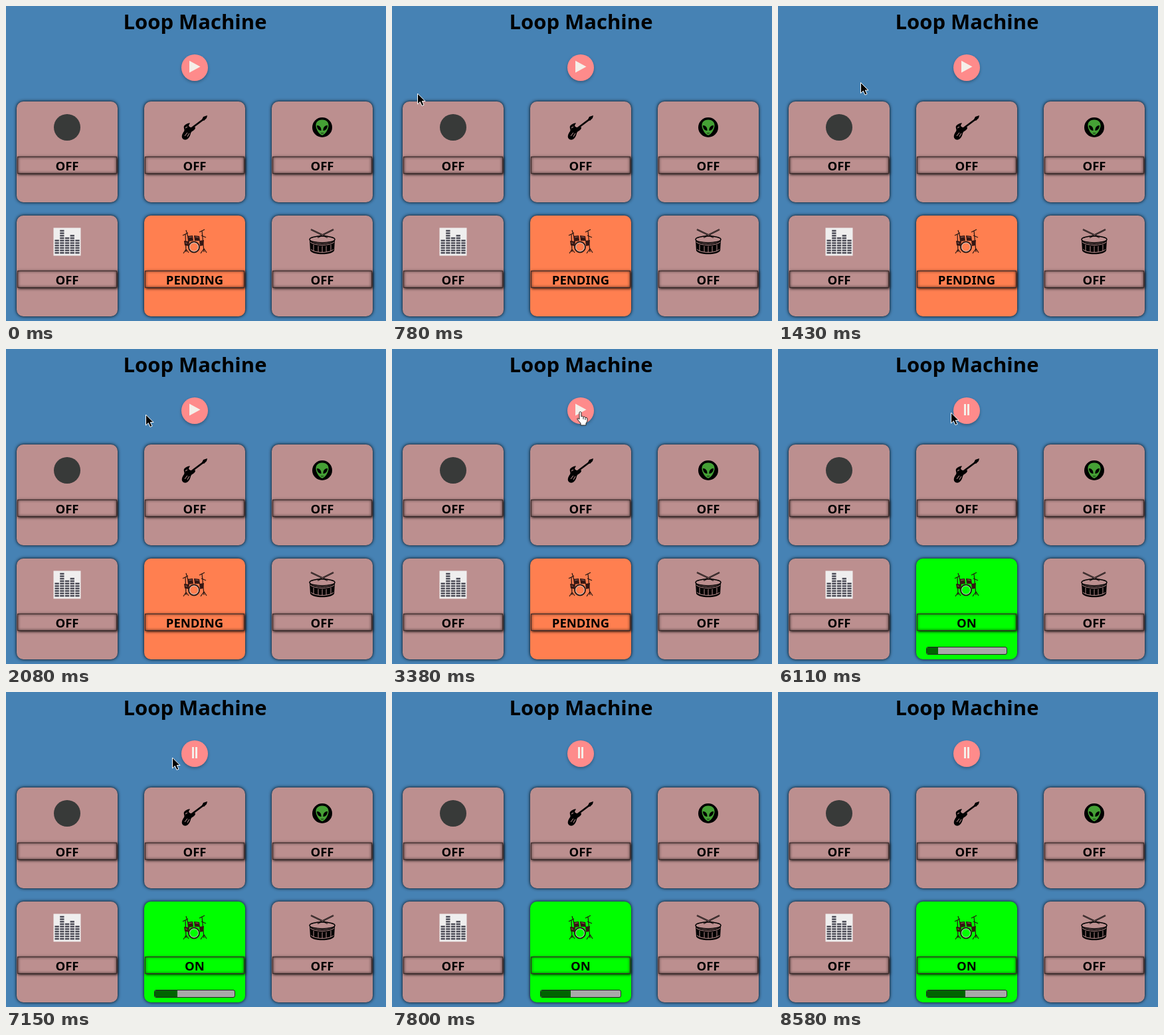
Write an HTML page that moves like this. It is 572x475 px and loops after 8710 ms.

```html
<!DOCTYPE html>
<html lang="en">
<head>
<meta charset="utf-8">
<title>Loop Machine</title>
<style>
  html, body { margin: 0; width: 100%; height: 100%; overflow: hidden; }
  body { position: relative; background: #4682b4; font: bold 18.5px "Noto Sans", "Open Sans", sans-serif; color: #000; }
  h1 { position: absolute; left: 0; top: 1px; width: 569px; margin: 0; font-size: 31px; line-height: 44px; text-align: center; }
  svg { position: absolute; overflow: visible; }
  #button { position: absolute; left: 264px; top: 73px; width: 40px; height: 40px; border-radius: 50%;
    background: #fe8b8b; box-shadow: 0 2px 4px rgba(0,0,0,.3); }
  .tile { position: absolute; width: 152px; height: 152px; border-radius: 10px; background: #bc8f8f; box-shadow: 0 0 5px #000; }
  .tile svg { left: 56px; top: 19px; }
  .label { position: absolute; left: 1px; top: 83px; width: 148px; height: 24px; line-height: 26px; text-align: center;
    border: 1px solid #3a2a2a; box-shadow: 1px 1px 4px #000, inset 0 0 4px rgba(0,0,0,.65); }
  .pending { background: #ff7f50; }
  .on { background: #0f0; }
  .bar { position: absolute; left: 15px; top: 133px; width: 120px; height: 10px; border: 1px solid #222;
    border-radius: 3px; background: #a9a9a9; overflow: hidden; visibility: hidden; }
  .on .bar { visibility: visible; }
  .bar i { display: block; height: 100%; background: #006400; }
</style>
</head>
<body>
<h1>Loop Machine</h1>
<div id="button">
  <svg width="40" height="40" fill="#f5efe9">
    <path id="play" d="M12 9.500L28.500 18.500 12 27.500z"/>
    <path id="pause" d="M16 10h3v17h-3zM21 10h3v17h-3z"/>
  </svg>
</div>
<script>
const $ = id => document.getElementById(id);

const equalizer = [6, 10, 7, 8, 6].map((count, col) =>
  Array.from({ length: count }, (_, row) =>
    `<rect x="${1.5 + col * 7.7}" y="${36 - row * 3.7}" width="6.3" height="2.5"/>`).join('')).join('');

const icons = [
  '<circle cx="20" cy="20" r="20" fill="#383a39"/>',

  `<path d="M3 38C-1 35 1 30 4 26C6 23 1 19 6 16C9 14 12 13 13 14C10 17 11 19 14 20C17 21 19 18 21 20C21 25 15 25 14 29C13 35 8 41 3 38z"/>
   <path d="M13 23L33 8" stroke="#000" stroke-width="2.8"/>
   <path d="M31 8L33 4 39 2 38 6 34 10z"/>
   <path d="M6 21L9 19M5 33L9 28M9 34L12 29" stroke="#a58080" stroke-width="1.2"/>`,

  `<circle cx="20" cy="20" r="15"/>
   <path d="M20 8.500C27 8.500 30 13 29.500 18C29 24 24 31 20 32C16 31 11 24 10.500 18C10 13 13 8.500 20 8.500z" fill="#45a035"/>
   <path d="M12 17C16 17 19 20 18.500 25C14 25 12 21 12 17zM28 17C24 17 21 20 21.500 25C26 25 28 21 28 17zM18 28.500h4v.8h-4z"/>`,

  `<path d="M-.5-.5h41v42h-41z" fill="#efeeee"/><g fill="#4b4b56">${equalizer}</g>`,

  `<g fill="none" stroke="#241512">
     <path d="M2 11L10 7M27 6L35 2M6 9L7 36M3 38L7 32 11 37M31 4L34 36M29 38L34 31 38 37M10 13L7 3M30 11L37 14" stroke-width="1.2"/>
     <circle cx="19" cy="28.500" r="8" stroke-width="1.8"/>
     <circle cx="19" cy="28.500" r="6.500" stroke="#bfc4c8" stroke-width="1"/>
   </g>
   <path d="M9 12L17 11 18 19 10 20zM19 11L27 12 28 19 20 19zM4 19L12 20 11 27 5 26zM27 19L34 18 33 26 28 27z" fill="#351713"/>
   <path d="M11 14L16 13M21 13L26 14M6 22L9 23" stroke="#94615a"/>`,

  `<g fill="none" stroke="#000">
     <path d="M3 2L28 14M37 2L13 14" stroke-width="2.2"/>
     <path d="M3 2L28 14M37 2L13 14" stroke="#bc8f8f" stroke-width=".6"/>
     <ellipse cx="20" cy="17" rx="19" ry="5" stroke-width="1.5"/>
   </g>
   <path d="M1 18C5 25 35 25 39 18L38 34C34 41 6 41 2 34z"/>
   <path d="M2 21C8 27 32 27 38 21M3 32C9 38 31 38 37 32M7 25v9M14 27v9M20 27v9M26 27v9M33 25v9" fill="none" stroke="#bc8f8f"/>`
];

document.body.insertAdjacentHTML('beforeend', icons.map((icon, i) => `
  <div class="tile" style="left:${16 + i % 3 * 192}px;top:${144 + (i / 3 | 0) * 172}px">
    <svg width="40" height="40">${icon}</svg>
    <div class="label">OFF</div><div class="bar"><i></i></div>
  </div>`).join('') + `
  <svg id="arrow" width="14" height="21" style="left:0;top:0">
    <path d="M.5 0V16L4.300 12.500 7 18.500 10 17.200 7.300 11.500H12z" stroke="#fff"/>
  </svg>
  <svg id="hand" width="18" height="22" style="left:-5px;top:-1px">
    <path d="M4 1.500Q5.500-.5 7 1.500V8Q8.500 6.500 10 8.500 12 7 13 9.500 15.500 8.500 16 11V15L14 18V21H6V18L1 12Q0 9 4 12z" fill="#fff" stroke="#222"/>
    <path d="M10 9v3M13 10v3" stroke="#222"/>
  </svg>`);

const STEP = 130, LOOP = 8710;
const holds = [[17, 21], [27, 31], [34, 37], [44, 44], [53, 54]];
// Pointer path: step, x, y
const path = [[5, 20, 137], [6, 38, 132], [16, 210, 99], [21, 210, 99], [26, 283, 95],
  [44, 283, 95], [47, 260, 96], [51, 250, 99], [55, 250, 99], [60, 16, 135]];
const drums = document.querySelectorAll('.tile')[4];
const label = drums.querySelector('.label'), fill = drums.querySelector('i');

function pointerAt(n) {
  const k = path.findIndex(p => p[0] > n);
  if (k < 1) return null;
  const [n0, x0, y0] = path[k - 1], [n1, x1, y1] = path[k];
  const u = (n - n0) / (n1 - n0);
  return [x0 + (x1 - x0) * u, y0 + (y1 - y0) * u];
}

function show(el, visible) { el.style.visibility = visible ? 'visible' : 'hidden'; }

function draw(time) {
  let n = Math.floor(time % LOOP / STEP);
  for (const [from, to] of holds) if (n >= from && n <= to) n = from - 1;

  const playing = n >= 38, on = n >= 39;
  show($('play'), !playing);
  show($('pause'), playing);
  drums.className = 'tile ' + (on ? 'on' : 'pending');
  label.textContent = on ? 'ON' : 'PENDING';
  fill.style.width = Math.max(0, 17 + (n - 47) * 2.16) + 'px';

  const at = pointerAt(n);
  const over = at && Math.hypot(at[0] - 284, at[1] - 93) < 20;
  show($('arrow'), at && !over);
  show($('hand'), over);
  if (at) $(over ? 'hand' : 'arrow').style.transform = `translate(${at[0]}px,${at[1]}px)`;
}

const start = performance.now();
function tick() {
  draw(performance.now() - start);
  requestAnimationFrame(tick);
}
tick();
</script>
</body>
</html>
```
